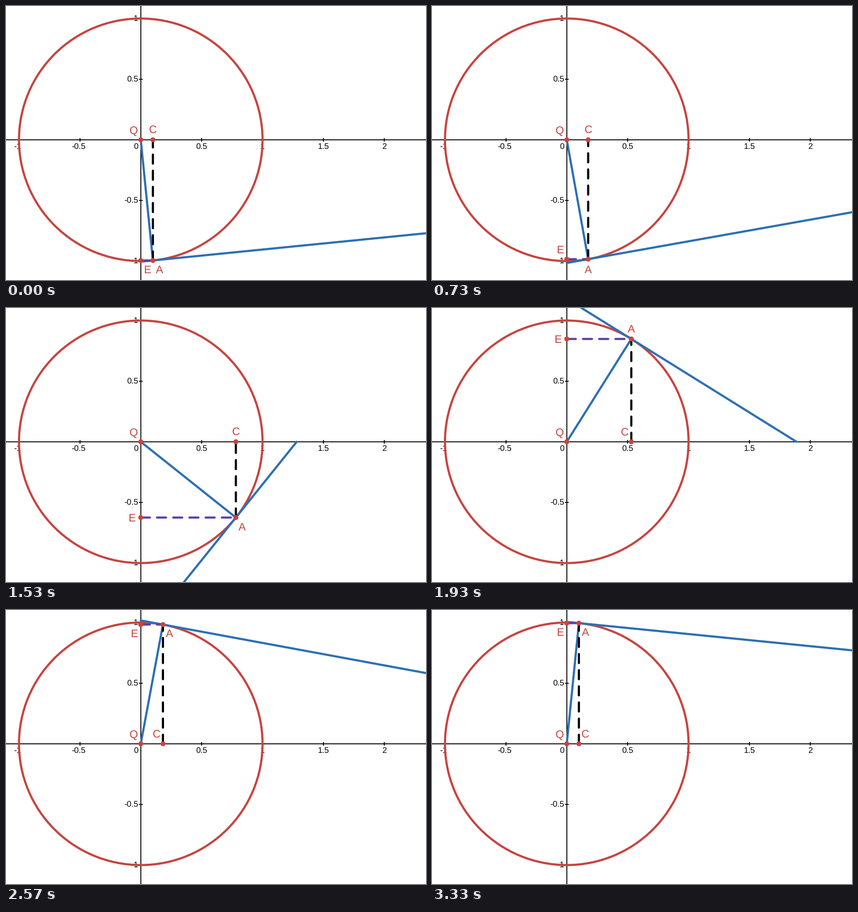
Recreate the animation shown at these times as a matplotlib script. Size 925 by 606 pixels, loop 3.36 s.

```python
import math

import matplotlib.pyplot as plt
from matplotlib.animation import FuncAnimation
from matplotlib.patches import Circle

W, H, DPI = 925, 606, 64
PT = 72 / DPI                     # points per pixel
OX, OY, UNIT = 296.8, 295.9, 268.2
RED, BLUE, PURPLE = "#c74440", "#2d70b3", "#6042a6"
STROKE = 4.76
TICK_SIZE, LABEL_SIZE = 18, 24
ADVANCE = {"-": 0.333, ".": 0.278, "A": 0.667, "E": 0.667, "C": 0.722, "Q": 0.778}

# label offsets from their points, in pixels
ABOVE, BELOW, LEFT = (0, -23.2), (0, 22), (-19.5, 0)
UP_LEFT, UP_RIGHT = (-14.4, -21.4), (14.4, -21.4)
LOW_LEFT, LOW_RIGHT = (-14.4, 19.7), (14, 19.7)

plt.rcParams["font.family"] = "Liberation Sans"
plt.rcParams["text.hinting"] = "none"

fig = plt.figure(figsize=(W / DPI, H / DPI), dpi=DPI, facecolor="white")
ax = fig.add_axes([0, 0, 1, 1])
ax.set_xlim(0, W)
ax.set_ylim(H, 0)
ax.axis("off")


def to_px(x, y):
    return OX + x * UNIT, OY - y * UNIT


def text_width(s, size):
    return size * sum(ADVANCE.get(ch, 0.556) for ch in s)


def write(x, baseline, s, size, color, z):
    return ax.text(x, baseline, s, fontsize=size * PT, color=color,
                   ha="left", va="baseline", zorder=z)


def stroke(color, z, dashed=False):
    line, = ax.plot([], [], color=color, lw=STROKE * PT, zorder=z, snap=False,
                    solid_capstyle="round", dash_capstyle="round")
    if dashed:
        line.set_linestyle((0, (4.2, 3.3)))
    return line


def rule(x0, y0, x1, y1):
    ax.plot([x0, x1], [y0, y1], color="black", lw=2 * PT, zorder=1,
            solid_capstyle="butt")


def draw_axes():
    rule(297, 0, 297, H)
    rule(0, 296, W, 296)
    write(290.9 - text_width("0", TICK_SIZE), 316, "0", TICK_SIZE, "black", 1)
    for v in (-1, -0.5, 0.5, 1, 1.5, 2):
        s = f"{v:g}"
        x, _ = to_px(v, 0)
        rule(x, 292, x, 300)
        # the digits, without the sign, are centred on the tick
        start = x - text_width(s.lstrip("-"), TICK_SIZE) / 2
        if v < 0:
            start -= text_width("-", TICK_SIZE)
        write(start, 316, s, TICK_SIZE, "black", 1)
        if abs(v) <= 1:
            _, y = to_px(0, v)
            rule(293, y, 301, y)
            write(290.9 - text_width(s, TICK_SIZE), y + 5, s, TICK_SIZE, "black", 1)


draw_axes()
ax.add_patch(Circle((OX, OY), UNIT, fill=False, ec=RED, lw=STROKE * PT, zorder=2))

radius = stroke(BLUE, 3)
tangent = stroke(BLUE, 4)
across = stroke(PURPLE, 5, dashed=True)
upright = stroke("black", 6, dashed=True)

dots, labels = {}, {}
for name in "QCEA":
    dots[name] = ax.add_patch(Circle((OX, OY), 5.5, fc=RED, lw=0, zorder=7))
    labels[name] = write(OX, OY, name, LABEL_SIZE, RED, 8)


def place(name, point, offset):
    dots[name].center = point
    x, y = point[0] + offset[0], point[1] + offset[1]
    labels[name].set_position((x - text_width(name, LABEL_SIZE) / 2, y + 8.6))


def label_offsets(u):
    """Free spot around each point for the slope u of the radius."""
    if u < -6.5:
        a, e = LOW_RIGHT, LOW_RIGHT
    else:
        e = LEFT if abs(u) < 2.7 else UP_LEFT if u < 0 else LOW_LEFT
        if u < -1.3:
            a = BELOW
        elif u < -0.1:
            a = LOW_RIGHT
        elif u < 1.1:
            a = UP_RIGHT
        else:
            a = ABOVE if u < 4.1 else LOW_RIGHT
    c = ABOVE if u < -0.1 else UP_LEFT if u < 7.9 else UP_RIGHT
    return a, c, e


def set_segment(line, p, q):
    line.set_data([p[0], q[0]], [p[1], q[1]])


def update(i):
    step = int((i + 0.5) * 0.3)   # 30 steps a second on a 10 ms clock
    u = (step - 50) / 5
    cos = 1 / math.hypot(1, u)
    sin = u * cos
    q, a = to_px(0, 0), to_px(cos, sin)
    c, e = to_px(cos, 0), to_px(0, sin)

    set_segment(radius, q, a)
    set_segment(across, e, a)
    low, high = (a, c) if u < 0 else (c, a)
    set_segment(upright, low, high)
    if step == 50:
        tangent.set_data([], [])  # vertical tangent has no slope
    else:
        set_segment(tangent, to_px(0, 1 / sin), to_px(1 / cos, 0))

    off_a, off_c, off_e = label_offsets(u)
    place("Q", q, (-15.8, -21.4))
    place("C", c, off_c)
    place("E", e, off_e)
    place("A", a, off_a)
    return [radius, tangent, across, upright, *dots.values(), *labels.values()]


anim = FuncAnimation(fig, update, frames=336, interval=10, repeat=True,
                     repeat_delay=0, init_func=lambda: update(0), blit=False)
plt.show()
```
